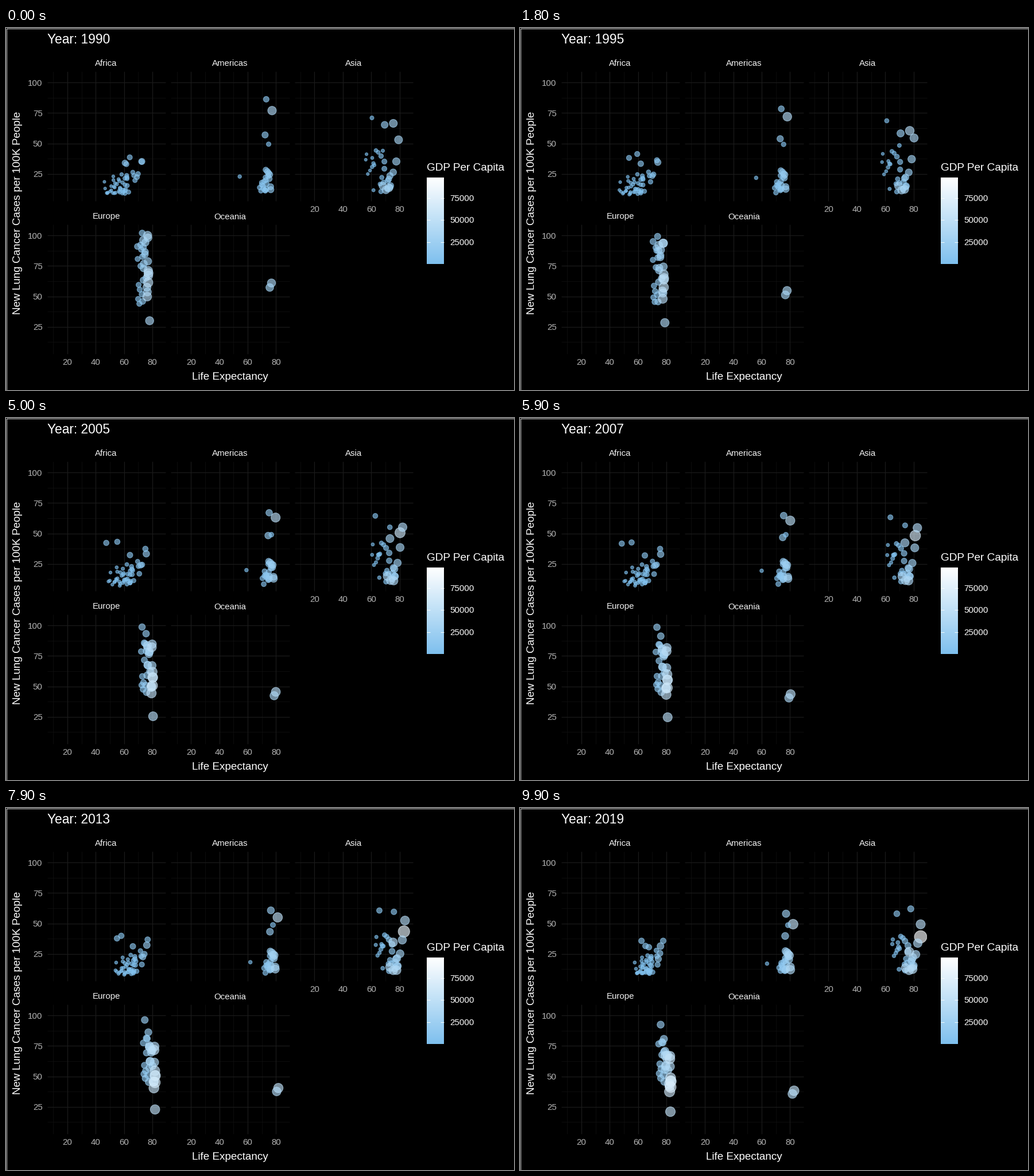
Recreate the animation shown at these times as a matplotlib script. Size 885 px wide and 632 px high, loop 10 s.

```python
import numpy as np
import matplotlib.pyplot as plt
from matplotlib.animation import FuncAnimation
from matplotlib.colors import LinearSegmentedColormap
from matplotlib.patches import Rectangle

W, H, DPI = 885, 632, 64
PT = 72 / DPI                       # points per pixel
N = 100
T = np.linspace(0, 1, N)
ARC = np.sin(np.pi * T)
PANELS = {"Africa": (0, 0), "Americas": (1, 0), "Asia": (2, 0),
          "Europe": (0, 1), "Oceania": (1, 1)}
BLUES = LinearSegmentedColormap.from_list("gdp", ["#7ec0ee", "#ffffff"])
GREY = "#b4b4b4"

plt.rcParams["font.family"] = "Liberation Sans"
rng = np.random.default_rng(12)
tracks = {name: [] for name in PANELS}


def life_x(v, col):
    return 57.6 + 2.469 * v + 215.25 * col


def cases_y(v, row):
    return 307.8 - 2.125 * v + 267 * row


def lerp(ends, t):
    return ends[0] + (ends[1] - ends[0]) * t


def country(name, life, cases, r, dip=0, bump=0):
    """One dot moving between start and end values, bent midway."""
    col, row = PANELS[name]
    track = [life_x(lerp(life, T) - dip * ARC, col),
             cases_y(lerp(cases, T) + bump * ARC, row), lerp(r, T)]
    tracks[name].append(track)
    return track


def crowd(name, n, life, cases, r, skew=1.0, drop=0.0, dip=0.0):
    """n dots spread by wealth; each range is (low, high) at start and end."""
    wealth = (np.arange(n) + rng.random(n)) / n
    load = rng.permutation((np.arange(n) + 0.5) / n) ** skew
    for w, c in zip(wealth, load):
        shift = rng.normal(0, 0.8)
        country(name,
                [lerp(ends, w ** 0.8) + shift for ends in life],
                [lerp(ends, c) * f for ends, f in zip(cases, (1, 1 - drop * w))],
                [lerp(ends, w ** 1.5) for ends in r],
                dip * rng.random() * (1 - w), rng.normal(0, 1.5))


crowd("Africa", 37, life=[(46, 63), (58, 70)], cases=[(9, 25), (9, 24)],
      r=[(3, 4.3), (3.3, 4.6)], skew=2, dip=4)
crowd("Africa", 6, life=[(61, 71), (69, 76)], cases=[(19, 27), (15, 29)],
      r=[(4, 5), (4.3, 6.3)])
country("Africa", (64, 62.4), (38.6, 35.7), (5, 5.5), dip=8, bump=6)
country("Africa", (61.6, 65.2), (33, 31.5), (5, 5.5), dip=16, bump=10)
country("Africa", (60.6, 67.6), (34, 30.5), (5.5, 5.5))
country("Africa", (72.5, 75.8), (35.2, 31.4), (6, 6.5), dip=-1.5)
country("Africa", (72.3, 77.7), (35, 35.7), (5, 5.5), bump=2)

crowd("Americas", 21, life=[(68, 76), (72, 80)], cases=[(11, 29), (11, 28)],
      r=[(4.5, 6), (5, 8)], skew=1.6)
country("Americas", (73.1, 77.2), (86.3, 58), (5.5, 7), bump=-5)
country("Americas", (77.2, 82.2), (77, 49.4), (8, 9))
country("Americas", (72.3, 76.6), (57, 39.7), (6, 6.7))
country("Americas", (74.8, 78.6), (49.4, 48.6), (4.5, 5))
island = country("Americas", (54.4, 63.8), (22.8, 17), (3.7, 3.7))
# a disaster year
island[0] -= 66 * np.clip(1 - abs(np.arange(N) - 68) / 3, 0, 1)

crowd("Asia", 25, life=[(55, 75), (64, 81)], cases=[(10, 45), (11, 40)],
      r=[(3, 6.5), (3.6, 7.8)], skew=1.1)
crowd("Asia", 3, life=[(66, 74), (72, 81)], cases=[(11, 16), (11, 14)],
      r=[(7, 7.5), (8, 8.5)])
country("Asia", (75.6, 85), (66.5, 39), (7.5, 11.3), bump=-2)
country("Asia", (79.3, 85), (53, 49.3), (7.5, 8.5), bump=4)
country("Asia", (77.7, 83), (35.2, 33.8), (7, 8), bump=4)
country("Asia", (69.5, 76.9), (65.3, 26.7), (6.5, 8.5))
country("Asia", (60.5, 68.2), (71, 58), (4, 5.7), dip=1.5)
country("Asia", (68.2, 78), (44, 62), (3.5, 6), bump=2)

crowd("Europe", 31, life=[(69.5, 77.5), (74.5, 83.5)],
      cases=[(43, 103), (50, 93)], r=[(5, 8.7), (6, 10)], drop=0.35)
country("Europe", (69.4, 75.9), (91, 92.5), (5.7, 6.7), bump=7)
country("Europe", (78, 82.8), (30, 21), (7.7, 9))

country("Oceania", (76.8, 82.9), (61, 38.2), (7.7, 9), bump=-4)
country("Oceania", (75.6, 81.7), (57.3, 35.6), (7.3, 8.3), bump=-4)

fig = plt.figure(figsize=(W / DPI, H / DPI), dpi=DPI, facecolor="black")
ax = fig.add_axes([0, 0, 1, 1])
ax.axis("off")


def label(x, y, s, size=15, color="white", ha="left", **kw):
    return ax.text(x, y, s, fontsize=size * PT, color=color, ha=ha,
                   va="baseline", **kw)


def grid(box, xs, ys, color, width):
    left, top, right, bottom = box
    style = dict(colors=color, linewidths=width * PT, zorder=1)
    ax.vlines(xs, top, bottom, **style)
    ax.hlines(ys, left, right, **style)


clouds = {}
for name, (col, row) in PANELS.items():
    left, top = 72 + 215.25 * col, 76 + 267 * row
    right, bottom = left + 206.3, top + 225.5
    box = left, top, right, bottom
    major_x = [life_x(v, col) for v in (20, 40, 60, 80)]
    major_y = [cases_y(v, row) for v in (25, 50, 75, 100)]
    grid(box, [life_x(v, col) for v in (10, 30, 50, 70)],
         [cases_y(v, row) for v in (12.5, 37.5, 62.5, 87.5)], "#121212", 0.7)
    grid(box, major_x, major_y, "#1a1a1a", 1.3)
    label((left + right) / 2 - 0.5, top - 9.5, name, ha="center", color="#f2f2f2")
    if row or col == 2:
        for v, x in zip((20, 40, 60, 80), major_x):
            label(x, bottom + 19.5, v, color=GREY, ha="center")
    if col == 0:
        for v, y in zip((25, 50, 75, 100), major_y):
            label(63.5, y + 5.7, v, color=GREY, ha="right")
    cloud = ax.scatter([], [], linewidths=1.1 * PT, zorder=3)
    cloud.set_clip_path(Rectangle((left, top), right - left, bottom - top,
                                  transform=ax.transData))
    clouds[name] = cloud, np.array(tracks[name])

title = label(72, 27, "", 22.7)
label(390.5, 614.3, "Life Expectancy", 18.9, ha="center")
label(25, 322.5, "New Lung Cancer Cases per 100K People", 18.9, ha="center",
      rotation=90, rotation_mode="anchor")

# colour bar
label(733, 249.3, "GDP Per Capita", 19)
ax.imshow(np.linspace(1, 0, 256)[:, None], cmap=BLUES, aspect="auto",
          extent=(733, 763, 412, 261), interpolation="bilinear", zorder=2)
for gdp in (25000, 50000, 75000):
    y = 412 - gdp * 0.00154
    label(773, y + 5.5, gdp)
    ax.hlines([y, y], [733, 757], [739, 763], colors="white",
              linewidths=0.9 * PT, zorder=3)

ax.add_patch(Rectangle((0.5, 0.5), W - 1, H - 1, fill=False,
                       edgecolor="#e0e0e0", linewidth=PT))
ax.set_xlim(0, W)
ax.set_ylim(H, 0)


def update(i):
    title.set_text(f"Year: {round(1990 + 29 * i / (N - 1))}")
    for cloud, data in clouds.values():
        x, y, r = data[:, :, i].T
        colors = BLUES(np.clip((r - 2.4) / 9, 0, 1) ** 2)
        colors[:, 3] = 0.65
        cloud.set_offsets(np.column_stack([x, y]))
        cloud.set_sizes((2 * (r - 0.5) * PT) ** 2)
        cloud.set_facecolor(colors)
        cloud.set_edgecolor(colors)
    return [title] + [cloud for cloud, _ in clouds.values()]


anim = FuncAnimation(fig, update, frames=N, interval=100, repeat=True,
                     repeat_delay=0, blit=False)
plt.show()
```
